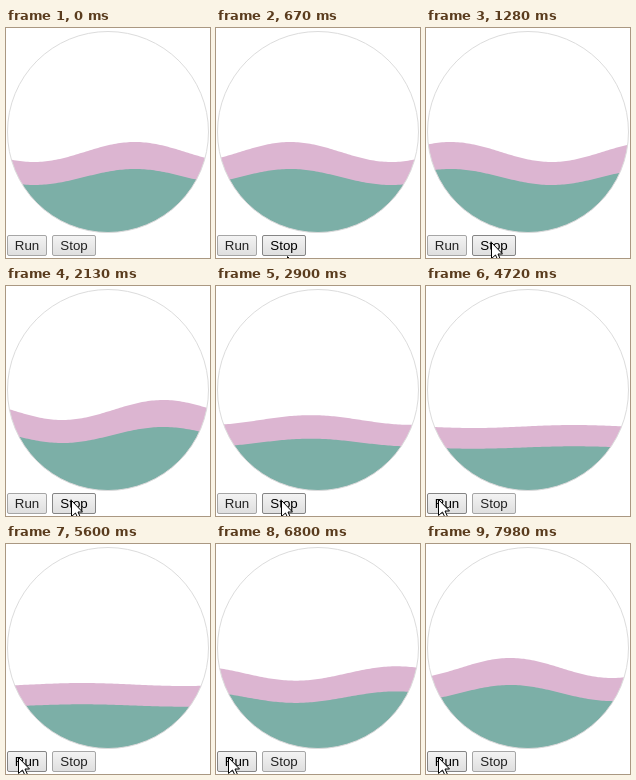
Write an HTML page with a canvas that moves like this. It is 204 px wide and 230 px high and loops after 8000 ms.

```html
<!DOCTYPE html>
<html lang="en">
<head>
<meta charset="utf-8">
<title>Wave in a circle</title>
<style>
  html, body { margin: 0; width: 100%; height: 100%; overflow: hidden; background: #fff; }
  canvas { display: block; }
</style>
</head>
<body>
<canvas id="stage" width="204" height="230"></canvas>
<script>
const ctx = document.getElementById('stage').getContext('2d');
const LOOP = 8000;
const WAVELENGTH = 202;
const SPEED = 0.0815; // pixels per ms, to the left
const STOP_AT = 2565;
const RUN_AT = 6430;
const FADE = 555;
const POINTER_AT = 600;

const bowl = new Path2D();
bowl.arc(102, 104, 100.5, 0, 2 * Math.PI);
const arrow = new Path2D('M0 0V16L4 12.5L6.5 18L9 17L6.5 11.5H11Z');

const ramp = (t, start, duration) => Math.min(1, Math.max(0, (t - start) / duration));
const smooth = p => p * p * (3 - 2 * p);

function drawWave(color, middle, amplitude, crest) {
  ctx.beginPath();
  ctx.moveTo(0, 230);
  for (let x = 0; x <= 204; x += 2) {
    ctx.lineTo(x, middle - amplitude * Math.cos((x - crest) * 2 * Math.PI / WAVELENGTH));
  }
  ctx.lineTo(204, 230);
  ctx.fillStyle = color;
  ctx.fill();
}

function drawBowl(t) {
  const level = 1 - ramp(t, STOP_AT, FADE) + ramp(t, RUN_AT, FADE);
  const crest = 129 - SPEED * t;
  ctx.save();
  ctx.clip(bowl);
  drawWave('#dcb5d1', 140.5 - 16.5 * level, 1.5 + 8.5 * level, crest);
  drawWave('#7cafa7', 161.5 - 12.5 * level, 1.2 + 6.8 * level, crest);
  ctx.restore();
  ctx.strokeStyle = '#dcdcdc';
  ctx.stroke(bowl);
}

function drawButton(label, x, width, pressAt, t, pointerX) {
  const hovered = pointerX >= x && pointerX <= x + width;
  const pressed = t >= pressAt - 100 && t < pressAt;
  const shade = ctx.createLinearGradient(0, 207, 0, 228);
  shade.addColorStop(0, pressed ? '#dedede' : '#f4f4f4');
  shade.addColorStop(1, pressed ? '#eaeaea' : '#dedede');
  ctx.fillStyle = shade;
  ctx.strokeStyle = hovered ? '#858585' : '#a6a6a6';
  ctx.beginPath();
  ctx.roundRect(x + 0.5, 207.5, width - 1, 20, 1.5);
  ctx.fill();
  ctx.stroke();
  ctx.fillStyle = hovered ? '#000' : '#222';
  ctx.font = '13.333px "Liberation Sans", Arial, sans-serif';
  ctx.textAlign = 'center';
  ctx.fillText(label, x + width / 2, 222);
}

function drawPointer(x, y) {
  ctx.save();
  ctx.translate(Math.round(x) + 0.5, Math.round(y) + 0.5);
  ctx.fillStyle = '#fff';
  ctx.fill(arrow);
  ctx.strokeStyle = '#000';
  ctx.stroke(arrow);
  ctx.restore();
}

function draw(t) {
  const visible = t >= POINTER_AT;
  const enter = ramp(t, POINTER_AT, 480);
  const cross = smooth(ramp(t, 3480, 1300));
  const pointerX = visible ? 72 - 7 * enter - 53 * cross : -1;
  ctx.fillStyle = '#fff';
  ctx.fillRect(0, 0, 204, 230);
  drawBowl(t);
  drawButton('Run', 1, 40, RUN_AT, t, pointerX);
  drawButton('Stop', 46, 44, STOP_AT, t, pointerX);
  if (visible) drawPointer(pointerX, 230 - 16 * enter - cross);
}

const start = performance.now();
function tick() {
  draw((performance.now() - start) % LOOP);
  requestAnimationFrame(tick);
}
tick();
</script>
</body>
</html>
```
